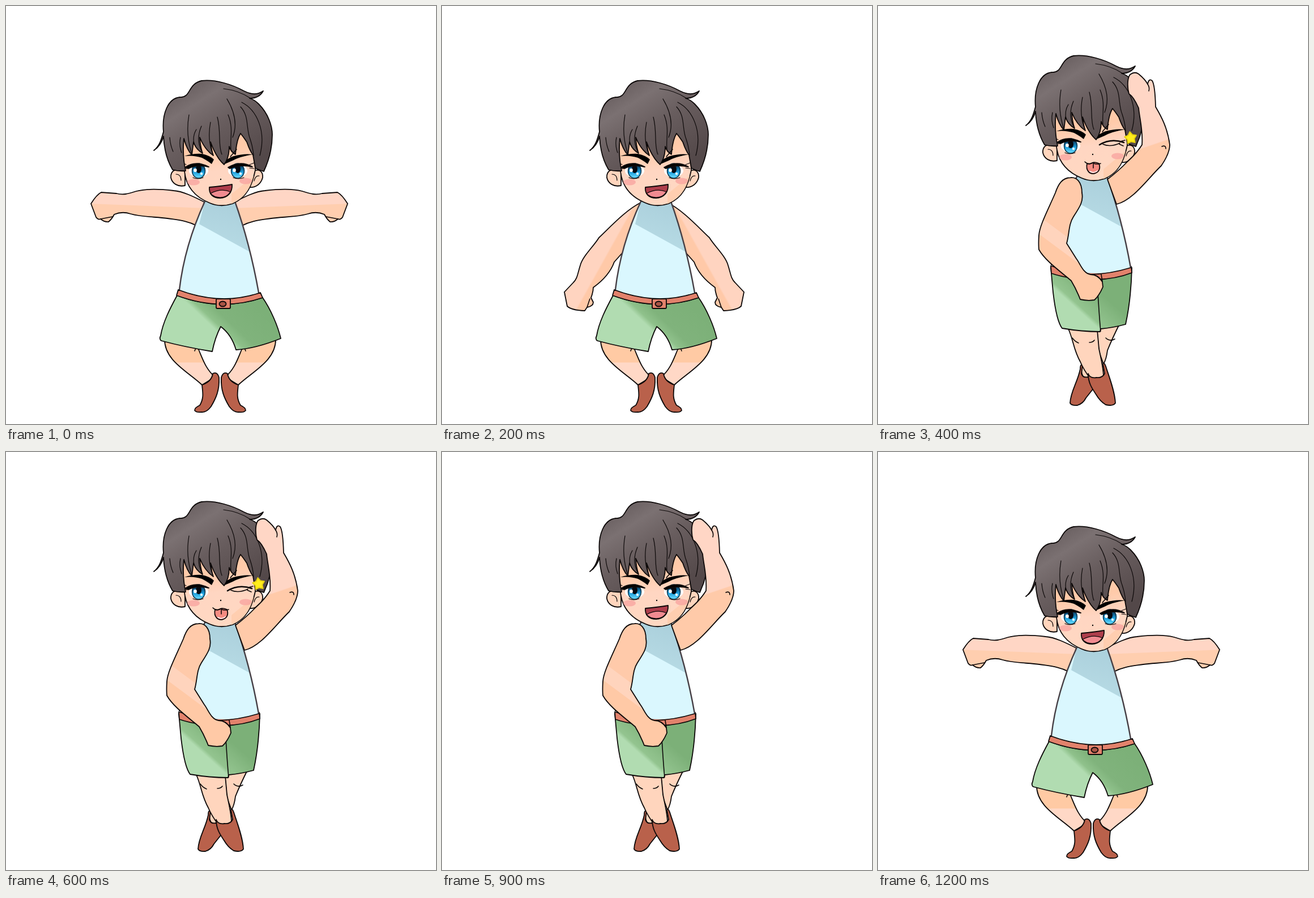
Write an HTML page that moves like this. It is 759 px wide and 738 px high and loops after 1300 ms.

```html
<!DOCTYPE html>
<html lang="en">
<head>
<meta charset="utf-8">
<title>Dancing boy</title>
<style>
  html, body { margin: 0; width: 100%; height: 100%; overflow: hidden; background: #fff; }
  svg { display: block; stroke-linecap: round; stroke-linejoin: round; }
  .ink { stroke: #0c0808; stroke-width: 1.8; }
  .line { fill: none; stroke: #0c0808; stroke-width: 1.6; }
  .thin { stroke-width: 1.2; }
  .bold { stroke-width: 2.6; }
  .seam { fill: none; stroke: #463f45; stroke-width: 2.4; }
  .skin { fill: #ffd5bd; }
  .shoe { fill: #b9614b; }
  .belt { fill: #e2826c; }
  .blush { fill: #f9a5a0; opacity: .8; }
</style>
</head>
<body>
<svg width="759" height="738" viewBox="0 0 759 738">
  <defs>
    <linearGradient id="hairTone" gradientUnits="userSpaceOnUse" x1="320" y1="140" x2="415" y2="290">
      <stop offset="0" stop-color="#6a6061"/><stop offset=".2" stop-color="#7b7172"/>
      <stop offset=".5" stop-color="#685d5e"/><stop offset="1" stop-color="#534849"/>
    </linearGradient>
    <linearGradient id="faceTone" gradientUnits="userSpaceOnUse" x1="360" y1="255" x2="375" y2="350">
      <stop offset="0" stop-color="#ffcaa9"/><stop offset=".4" stop-color="#ffd6c2"/>
      <stop offset="1" stop-color="#ffd8c2"/>
    </linearGradient>
    <linearGradient id="shirtShade" gradientUnits="userSpaceOnUse" x1="390" y1="346" x2="372" y2="412">
      <stop offset="0" stop-color="#abd0dc"/><stop offset="1" stop-color="#b5d9e3"/>
    </linearGradient>
    <linearGradient id="wideShorts" gradientUnits="userSpaceOnUse" x1="335" y1="590" x2="415" y2="505">
      <stop offset=".32" stop-color="#b1dcb1"/><stop offset=".4" stop-color="#8fc18b"/>
      <stop offset=".55" stop-color="#80b37c"/><stop offset="1" stop-color="#7cb078"/>
    </linearGradient>
    <linearGradient id="slimShorts" gradientUnits="userSpaceOnUse" x1="340" y1="550" x2="385" y2="500">
      <stop offset=".28" stop-color="#b1dcb1"/><stop offset=".38" stop-color="#93c48f"/>
      <stop offset="1" stop-color="#7cb078"/>
    </linearGradient>
    <linearGradient id="outArm" gradientUnits="userSpaceOnUse" x1="240" y1="325" x2="238" y2="376">
      <stop offset=".53" stop-color="#ffd6c5"/><stop offset=".55" stop-color="#ffceaf"/>
    </linearGradient>
    <linearGradient id="lowArm" gradientUnits="userSpaceOnUse" x1="256" y1="412" x2="344" y2="461">
      <stop offset=".42" stop-color="#ffd4c0"/><stop offset=".45" stop-color="#ffc9a8"/>
    </linearGradient>
    <linearGradient id="hipArm" gradientUnits="userSpaceOnUse" x1="338" y1="405" x2="312" y2="440">
      <stop offset=".1" stop-color="#ffcaaa"/><stop offset=".12" stop-color="#ffd4bd"/>
      <stop offset=".68" stop-color="#ffd4bd"/><stop offset=".7" stop-color="#ffc9a6"/>
    </linearGradient>
    <linearGradient id="headArm" gradientUnits="userSpaceOnUse" x1="450" y1="190" x2="482" y2="285">
      <stop offset="0" stop-color="#ffd6c5"/><stop offset=".62" stop-color="#ffd6c5"/>
      <stop offset=".64" stop-color="#ffcaa9"/>
    </linearGradient>
    <linearGradient id="legTone" gradientUnits="userSpaceOnUse" x1="0" y1="600" x2="0" y2="660">
      <stop offset=".48" stop-color="#ffcaa4"/><stop offset=".5" stop-color="#ffd8c6"/>
    </linearGradient>
    <linearGradient id="irisTone" x2="0" y2="1">
      <stop offset="0" stop-color="#06131f"/><stop offset=".3" stop-color="#0d5a88"/>
      <stop offset=".6" stop-color="#1d9fdc"/><stop offset="1" stop-color="#6fe0ff"/>
    </linearGradient>

    <g id="iris">
      <ellipse rx="17" ry="11" fill="#fff"/>
      <ellipse rx="11.5" ry="13" fill="url(#irisTone)" stroke="#0b3148" stroke-width="1.5"/>
      <ellipse cy="-3" rx="5" ry="7" fill="#04080f"/>
      <ellipse cx="-6" cy="-1" rx="2.8" ry="3.2" fill="#fff"/>
      <circle cx="5" cy="5" r="2.2" fill="#e6faff"/>
    </g>

    <g id="outSide">
      <path class="ink" fill="url(#outArm)" d="M350 346C332 337 312 327 296 326C270 323 245 323 230 327C215 332 206 334 195 331L168 329Q160 333 150 349L159 373Q163 378 167 376Q174 382 181 381Q187 376 191 368Q205 362 220 367C240 373 265 372 285 375C305 378 320 379 337 388Z"/>
      <path class="line" d="M167 376L188 372"/>
    </g>
    <g id="lowSide">
      <path class="ink" fill="url(#lowArm)" d="M351 347C325 360 300 387 277 409C268 424 248 442 244 458C239 474 239 481 232 488L216 505L221 530Q228 537 252 538L256 532Q267 530 267 523L263 515Q267 505 267 497C285 484 298 469 304 452L320 434L350 380Z"/>
      <path class="line" d="M256 532L261 517"/>
    </g>
    <g id="bentLeg">
      <path class="ink" fill="url(#legTone)" d="M280 588C279 626 322 646 346 669L369 655C352 641 347 622 338 602Z"/>
      <path class="line" d="M333 609L335 604"/>
      <path class="ink shoe" d="M346 669Q363 663 365 649Q373 645 376 656C377 678 371 692 362 707Q354 718 345 717Q336 718 333 714Q333 709 342 705C350 692 347 681 346 669Z"/>
    </g>

    <g id="torso">
      <path fill="#daf7fe" d="M351 344H404C420 390 436 450 446 506Q380 528 306 501C312 450 328 395 351 344Z"/>
      <path fill="url(#shirtShade)" d="M351 344H404Q420 388 430 434L341 385Z"/>
      <path class="seam" d="M404 345C420 390 436 450 446 506M306 501C312 450 328 395 351 345"/>
    </g>
  </defs>

  <!-- Crouching body -->
  <g data-on="012">
    <g data-on="0"><use href="#outSide"/><use href="#outSide" transform="matrix(-1 0 0 1 753 0)"/></g>
    <g data-on="1">
      <use href="#outSide" transform="rotate(-28 345 362)"/>
      <use href="#outSide" transform="matrix(-1 0 0 1 753 0) rotate(-28 345 362)"/>
    </g>
    <g data-on="2"><use href="#lowSide"/><use href="#lowSide" transform="matrix(-1 0 0 1 749 0)"/></g>
    <use href="#bentLeg"/><use href="#bentLeg" transform="matrix(-1 0 0 1 756 0)"/>
    <path class="ink" fill="url(#wideShorts)" d="M302 511Q377 540 453 515C467 535 480 565 485 587Q440 605 406 607Q398 580 379 566Q369 585 364 610Q315 602 274 591Q270 588 273 582C277 558 290 533 302 511Z"/>
    <use href="#torso"/>
    <path class="ink belt" d="M304 501Q380 530 449 506L453 515Q380 540 301 511Z"/>
    <rect class="ink belt" x="371" y="517" width="25" height="17" rx="2"/>
    <ellipse class="ink" cx="382.5" cy="526" rx="6" ry="4.5" fill="#a95445"/>
  </g>

  <!-- Standing body -->
  <g data-on="3456">
    <path class="ink skin" d="M386 568L390 610L398 632Q403 624 405 608Q413 588 427 560Z"/>
    <path class="ink skin" d="M363 629Q354 647 366 659L378 657Z"/>
    <path class="ink shoe" d="M361 635Q357 631 357 641C352 665 340 680 339 701Q342 706 352 705Q362 702 367 692L382 673L371 655Q361 657 359 649Z"/>
    <path class="ink skin" d="M336 570C345 590 345 607 357 628Q363 642 374 657Q386 662 398 654C398 640 394 625 390 605L387 572Z"/>
    <path class="line" d="M343 586Q347 592 354 595M382 590Q379 594 373 594M402 586Q409 593 418 588"/>
    <path class="ink shoe" d="M371 649Q374 658 386 656Q396 657 400 649L397 632Q399 628 402 636C408 655 418 680 419 701Q415 707 402 704Q392 698 385 686C377 674 371 665 371 649Z"/>
    <path class="ink" fill="url(#slimShorts)" d="M305 462H448C447 505 443 535 437 562Q415 568 393 570L392 575Q360 575 325 569C318 560 313 540 309 505Z"/>
    <path class="line" d="M386 480C389 515 390 545 393 574"/>
    <path class="ink belt" d="M305 459Q380 482 447 460L448 471Q420 482 385 483Q338 483 306 472Z"/>
    <use href="#torso" y="-44"/>
    <path class="line" d="M446 462Q410 473 375 474M394 474L396 486"/>
    <path class="ink" fill="url(#hipArm)" d="M360 330C360 310 350 302 340 303C325 303 318 315 313 330C300 360 285 388 284 405Q283 420 284 430C295 450 325 471 341 485Q350 500 357 518Q370 521 382 519Q390 512 397 496L396 487Q388 474 375 474C362 472 357 455 350 446Q338 427 333 419C338 402 336 386 345 372C356 355 363 345 360 330Z"/>
  </g>

  <g id="head">
    <path class="ink skin" d="M316 292C302 284 290 290 291 303C293 313 303 320 316 317Z"/>
    <path class="ink skin" d="M436 292C446 286 454 292 453 303C450 314 441 321 430 320Z"/>
    <path class="line thin" d="M300 297Q309 297 309 308M447 300Q440 299 438 309"/>
    <path class="ink" fill="url(#faceTone)" d="M307 235L315 292C318 320 335 338 360 348Q379 356 400 349C425 338 434 318 440 290L438 225Q370 190 307 235Z"/>
    <path fill="#ffceb0" d="M437 300L398 332V349C424 338 432 318 437 300Z"/>
    <ellipse class="blush" cx="331" cy="311" rx="11" ry="5.5"/>
    <ellipse class="blush" cx="423" cy="309" rx="11" ry="5.5"/>
    <circle cx="379" cy="306" r="1.2"/>

    <use href="#iris" x="340" y="291"/>
    <path class="ink" d="M316 285Q334 272 358 284Q336 279 322 287Z"/>
    <path class="line thin" d="M318 280L311 277M320 287L313 288M330 303Q338 307 348 303"/>
    <g data-on="0123">
      <use href="#iris" x="409" y="291"/>
      <path class="ink" d="M392 285Q414 272 435 284Q414 279 395 287Z"/>
      <path class="line thin" d="M430 280L438 277M430 286L438 287M401 303Q410 307 420 303"/>
      <path class="ink" fill="#ae3e4c" d="M359 320Q381 318 399 315C400 330 390 339 378 339C365 339 358 332 359 320Z"/>
      <path class="line thin" style="fill:#f08b91" d="M361 331Q379 321 396 328Q390 338 378 338Q367 338 361 331Z"/>
    </g>
    <g data-on="456">
      <path class="line bold" d="M391 289Q411 277 434 285"/>
      <path class="line" d="M397 288Q410 294 427 286M428 283L436 281M426 288L433 291"/>
      <path class="ink" fill="#f58c82" d="M369 322C366 336 375 341 381 340C391 338 393 330 390 322Q382 319 378 321Q373 324 369 322Z"/>
      <path class="line" d="M365 319Q371 325 379 321Q386 325 393 322M380 323V330"/>
      <path d="M374 336Q381 340 387 335" fill="none" stroke="#fff" stroke-width="1.5"/>
    </g>

    <path class="ink" fill="url(#hairTone)" d="M261 255C272 246 274 235 278 222C275 190 286 163 307 161C327 162 320 138 345 132C370 129 400 139 420 150C434 157 444 157 454 150Q447 163 430 163Q438 165 446 173C463 190 470 212 470 227C470 253 463 275 455 292Q445 289 440 286L436 263Q430 255 425 240Q419 231 414 225Q407 236 405 262Q397 258 394 248Q394 268 385 280Q371 268 361 240Q363 256 366 264Q351 254 342 232Q343 249 347 260Q335 253 331 240L328 263Q319 253 314 234Q311 263 317 291Q304 292 294 289C285 274 279 252 278 230Q274 246 261 255Z"/>
    <path class="line thin" d="M323 192C319 215 321 240 328 261M308 232Q305 246 310 259M345 212Q335 235 345 256M361 205Q355 236 365 261M373 196C380 222 374 246 381 262M392 192C402 216 395 235 397 253M390 164C402 184 410 207 400 232M414 178C430 195 423 216 431 235Q436 250 437 264M416 170C442 183 460 220 448 264M336 218Q329 229 332 244M289 232Q290 246 295 257M384 146Q410 149 430 162"/>
    <path d="M315 265Q330 260 346 261Q360 264 367 271L363 279Q357 274 346 268Q331 263 315 265ZM386 279Q388 269 402 265Q420 260 436 262Q412 266 400 273Z"/>
    <path class="line" d="M396 266L407 253"/>
  </g>

  <g data-on="3456">
    <path class="ink" fill="url(#headArm)" d="M405 306Q425 291 440 275Q456 261 466 245C468 220 462 200 460 180Q451 160 443 155C439 140 441 125 445 121Q453 115 460 120Q472 130 476 138Q478 127 484 132Q489 140 490 178C500 195 511 215 515 245Q515 260 500 282C475 306 450 343 421 350Z"/>
    <path class="line" d="M476 138Q480 144 478 150M501 248Q508 245 508 252"/>
  </g>
  <g data-on="456">
    <path id="star" fill="#ffed1c" stroke="#e6cf10" stroke-width="2"/>
  </g>
</svg>
<script>
  const STEP = 100, STEPS = 13, LIFT = -44;
  const head = document.getElementById('head');
  const star = document.getElementById('star');
  const parts = document.querySelectorAll('[data-on]');

  const corners = Array.from({ length: 10 }, (_, i) => {
    const a = i * Math.PI / 5 - Math.PI / 2, r = i % 2 ? 6.5 : 11;
    return [r * Math.cos(a), r * Math.sin(a)].map(v => v.toFixed(2)).join(' ');
  });
  star.setAttribute('d', `M${corners.join('L')}Z`);

  function draw(now) {
    const i = Math.floor(now / STEP) % STEPS;
    const pose = Math.min(i, STEPS - 1 - i); // forwards, then back
    for (const part of parts)
      part.style.display = part.dataset.on.includes(pose) ? '' : 'none';
    head.setAttribute('transform', `translate(0 ${pose > 2 ? LIFT : 0})`);
    star.setAttribute('transform', `translate(446 233) rotate(${pose === 5 ? 18 : -8})`);
  }

  const start = performance.now();
  function tick() {
    draw(performance.now() - start);
    requestAnimationFrame(tick);
  }
  tick();
</script>
</body>
</html>
```
